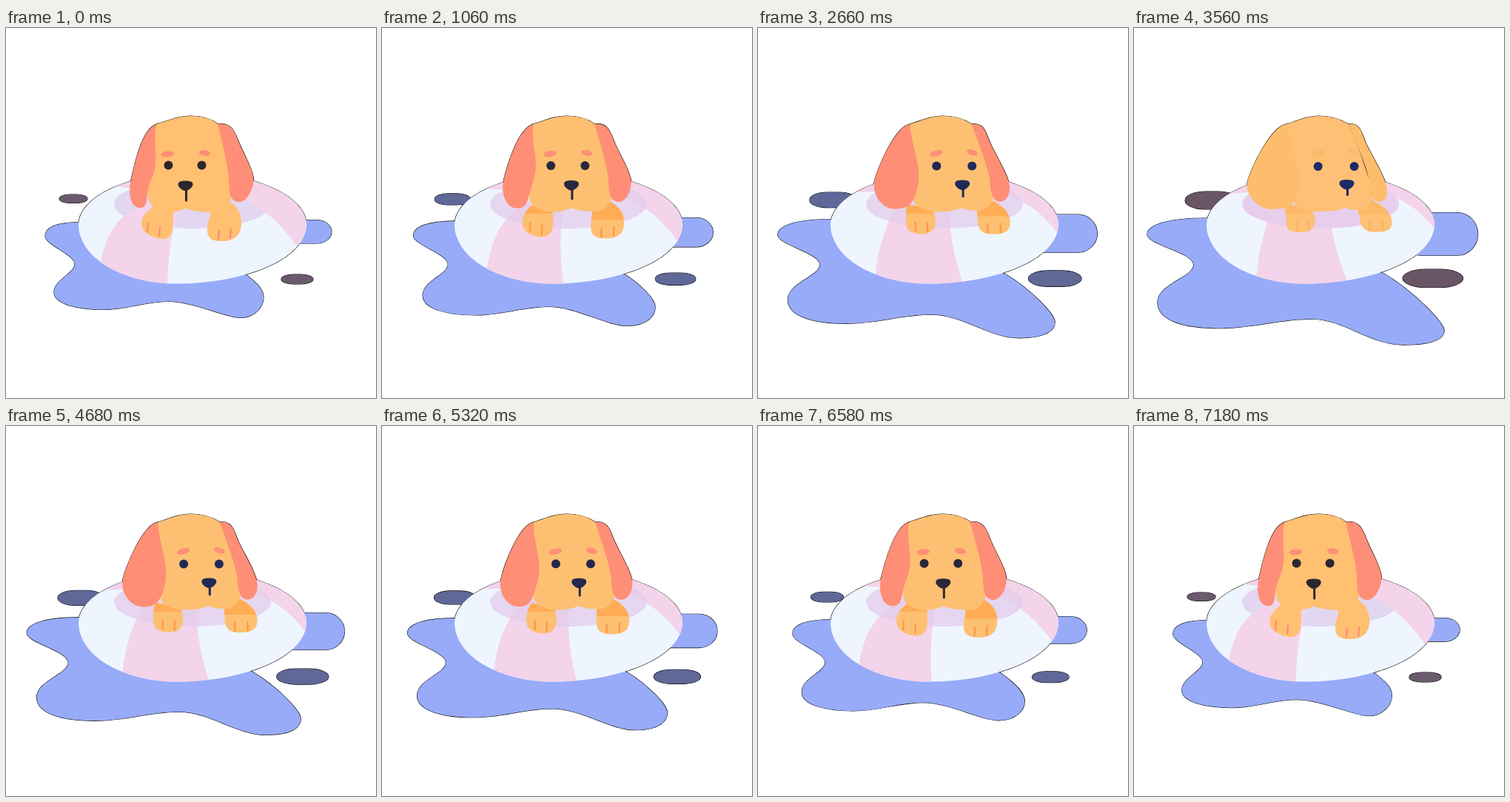
Recreate the animation shown at these times as an HTML page. Size 500 px wide and 500 px high, loop 7.22 s.

```html
<!DOCTYPE html>
<html lang="en">
<head>
<meta charset="utf-8">
<title>Puppy in a swim ring</title>
<style>
  html, body { margin: 0; width: 100%; height: 100%; overflow: hidden; background: #fff; }
  svg { display: block; width: 100vw; height: 100vh; }
  .line { fill: none; stroke-linecap: round; }
</style>
</head>
<body>
<svg viewBox="0 0 500 500">
  <defs>
    <path id="ring" d="M98 266A154 70 0 0 1 406 266A176 79.5 0 0 1 230 345.5A132 79.5 0 0 1 98 266Z" fill="#eef5ff"/>
    <clipPath id="inRing"><use href="#ring"/></clipPath>
    <clipPath id="inArmL"><use href="#armL"/></clipPath>
    <clipPath id="inArmR"><use href="#armR"/></clipPath>
  </defs>

  <!-- Outline of the whole silhouette; the fills above leave only its rim. -->
  <g stroke="#000" stroke-width="1.1">
    <use href="#puddle"/><use href="#lobe"/><use href="#spotL"/><use href="#spotR"/>
    <use href="#ring"/><use href="#face"/><use href="#earL"/><use href="#earR"/>
  </g>

  <path id="puddle" fill="#98abf8"/>
  <rect id="lobe" fill="#98abf8"/>
  <rect id="spotL" class="spot"/>
  <rect id="spotR" class="spot"/>

  <use href="#ring"/>
  <g id="tube" clip-path="url(#inRing)">
    <g id="panels" fill="#f3d4ea"><path id="panelTop"/><path id="panelFront"/></g>
    <ellipse id="hole" class="hole" cx="252" cy="238" rx="106" ry="33"/>
  </g>

  <path id="armL" class="fur"/>
  <path id="armR" class="fur"/>
  <rect id="shadeL" class="shade" width="500" clip-path="url(#inArmL)"/>
  <rect id="shadeR" class="shade" width="500" clip-path="url(#inArmR)"/>
  <path id="toes" class="line" stroke-width="2.6"/>

  <path id="face" class="fur"/>
  <path id="earL" class="ear"/>
  <path id="earR" class="ear"/>
  <ellipse id="browL" class="brow" rx="9" ry="4"/>
  <ellipse id="browR" class="brow" rx="7.7" ry="3.8"/>
  <g id="ink">
    <circle id="eyeL" r="6"/>
    <circle id="eyeR" r="6"/>
    <path id="nose" d="M-10-1.5C-10-6-5-6.5 0-6.5S10-6 10-1.5C10 2 4 7 0 7S-10 2-10-1.5Z"/>
    <path id="mouth" class="line" stroke-width="3"/>
  </g>
</svg>

<script>
const LOOP = 7220, HALF = 3600;
const $ = id => document.getElementById(id);
const lerp = (a, b, p) => a + (b - a) * p;
const set = (id, attrs) => {
  for (const key in attrs) $(id).setAttribute(key, attrs[key]);
};

// Blends two paths that share the same commands.
function morph([from, to], p) {
  const ends = to.match(/[\d.]+/g);
  let i = 0;
  return from.replace(/[\d.]+/g, n => lerp(+n, +ends[i++], p).toFixed(2));
}

// Facing the viewer, then turned to the right.
const body = {
  puddle: [
    'M98 262.5C70 263 53 269 53 281S93 306 93 319S65 340 65 357S100 380.5 132 380.5S188 369.5 220 369.5S298 391.5 317 391.5S348 377 348 364S334 341 325 334Z',
    'M98 257C50 257 17.5 265 17.5 279S80.5 303 80.5 320S31.5 346 31.5 371S68 406 115 406S195 393.5 240 393.5S318 428.5 365 428.5S420 418 420 409S382 358 337 331.5Z'],
  face: [
    'M203 130C220 125 232 119 250 119S278 123 287 130C298 160 308 200 304 232Q298 250 282 249Q255 249 243 243.5Q233 248 222 249Q196 248 192 230Q188 190 203 130Z',
    'M206 130C223 125 232 119 250 119S280 124 290 130C303 160 316 195 324 228Q314 246 303 246Q294 246 286 243Q275 248 255 248Q228 249 217 237Q208 190 206 130Z'],
  earL: [
    'M203 130C198 160 208 180 197 203S195 243 181 243S165 220 169 205S182 138 203 130Z',
    'M206 130C212 165 226 190 223 215S208 245 187 245S150 225 153 209S185 132 206 130Z'],
  earR: [
    'M286 130C305 127 309 140 315 155S334.5 192 334.5 205S325 235 316 235S301.5 230 301.5 212S296 170 286 130Z',
    'M290 130C307 128 307 142 314 157S342 205 342 219S337 234.5 331 234.5S319 228 318 210S305 168 290 130Z'],
  armL: [
    'M200 241C190 250 183 253 183 265S200 285 213 285S226 270 226 246Z',
    'M203 238C203 248 206 250 206 262S212 276 226 276S254 265 238 243Z'],
  armR: [
    'M276 247C277 258 272 260 272 273S280 288 293 288S318 282 318 264S308 238 300 234Z',
    'M302 242C304 252 305 252 306 260S312 275.5 326 275.5S349 274 349 262S335 238 318 231Z']
};
const panels = {
  panelTop: [
    'M120 210Q150 214 175 217L322 232Q365 250 402 308L420 180L90 180Z',
    'M110 227Q130 223 156 222L320 220Q378 228 412 280L420 180L90 180Z'],
  panelFront: [
    'M126 330Q132 272 166 249L190 236L235 240Q219 285 218 350L126 350Z',
    'M165 345Q168 300 180 263L190 236L264 240Q266 290 292 350L165 350Z']
};

const looks = {
  rest: { fur: '#ffc072', ear: '#ff8e78', brow: '#ff8e78', shade: '#ffc072', toe: '#ff8e78', spot: '#6b5a6e', hole: '#e3d6f1' },
  turn: { fur: '#fdc072', ear: '#ff8e76', brow: '#ff8e76', shade: '#ffac54', toe: '#ff9a48', spot: '#5f6896', hole: 'rgba(227,205,235,.75)' },
  far: { fur: '#fec074', ear: '#fdbd6c', brow: '#fbb96c', shade: '#fdb968', toe: '#fbb464', spot: '#6a5566', hole: '#e7ceec' }
};

function applyLook(name) {
  const { toe, ...fills } = looks[name];
  for (const cls in fills)
    for (const el of document.getElementsByClassName(cls)) el.setAttribute('fill', fills[cls]);
  set('toes', { stroke: toe });
  // At rest the pink panels hide the far side of the opening.
  $('tube').append($(name === 'rest' ? 'panels' : 'hole'));
}

function pill(id, x, y, width, height, round = width * .38) {
  set(id, { x, y, width, height, rx: round, ry: height / 2 });
}

const place = (id, x, y, angle = 0) =>
  set(id, { transform: `translate(${x} ${y}) rotate(${angle})` });

let look;
function draw(time) {
  const p = Math.max(0, 1 - Math.abs(time - HALF) / HALF);
  const roll = p * (1.4 - .4 * p);
  const go = (from, to) => lerp(from, to, p);

  const nextLook = p < .03 ? 'rest' : p > .95 ? 'far' : 'turn';
  if (nextLook !== look) applyLook(look = nextLook);

  for (const id in body) set(id, { d: morph(body[id], p) });
  for (const id in panels) set(id, { d: morph(panels[id], roll) });

  pill('lobe', 360, go(259.5, 249.5), go(80, 105), go(31.5, 58), go(20, 28));
  pill('spotL', go(72, 69), go(225, 221), go(38, 73), go(11.5, 24));
  pill('spotR', go(372, 363), go(333, 326), go(43, 82), go(13, 24.5));

  set('shadeL', { height: 251 });
  set('shadeR', { height: go(262, 252) });
  const toe = (x, y, turnedX) => `M${go(x, turnedX)} ${go(y, 262)}l${go(-1, 1)} 11.5`;
  set('toes', { d: toe(192, 264, 220) + toe(208, 269, 236) + toe(288, 274, 318) + toe(304, 272, 336) });

  const eyeY = go(185.5, 187), noseX = go(242.5, 288), noseY = go(213, 211.5);
  place('browL', go(218, 249), go(170.5, 169), go(-5, -20));
  place('browR', go(268.5, 297), go(169, 168), go(8, 22));
  place('eyeL', go(219.5, 249), eyeY);
  place('eyeR', go(264.5, 298), eyeY);
  place('nose', noseX, noseY);
  set('mouth', { d: `M${noseX + 1} ${noseY + 5}V${go(233, 225.5)}` });
  const ink = `rgb(${go(44, 28)},${go(38, 42)},${go(46, 104)})`;
  set('ink', { fill: ink });
  set('mouth', { stroke: ink });
}

const start = performance.now();
function tick() {
  draw((performance.now() - start) % LOOP);
  requestAnimationFrame(tick);
}
tick();
</script>
</body>
</html>
```
